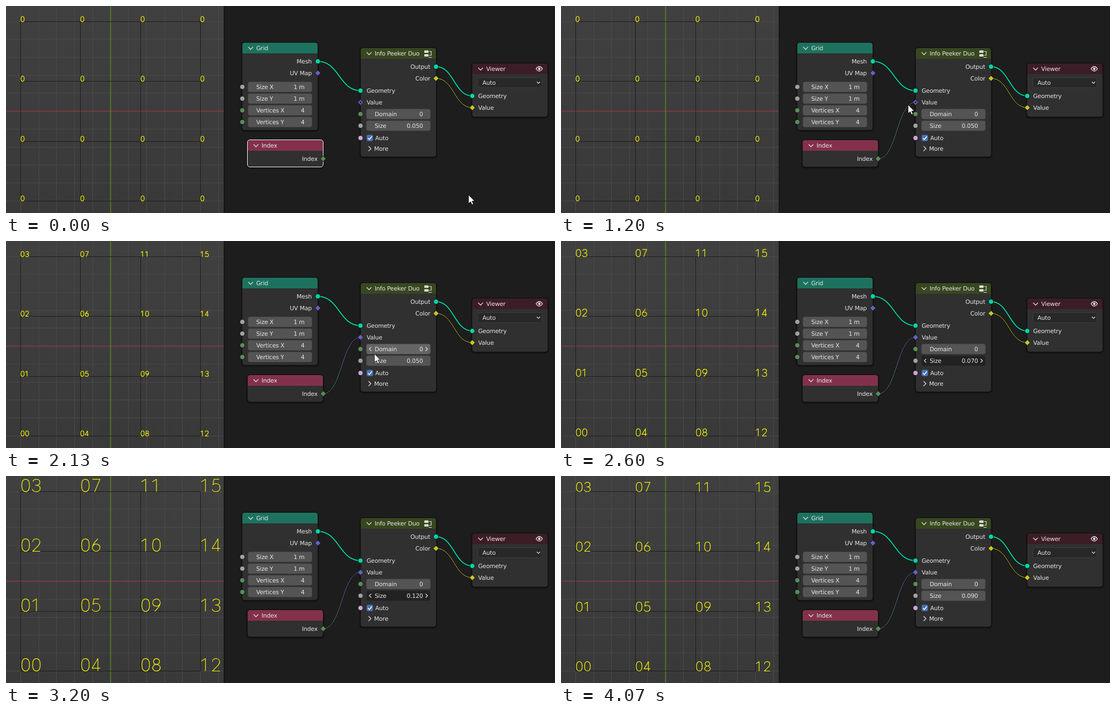
An HTML page for the animation above (4.74 s loop, 1029 by 389 pixels).

```html
<!DOCTYPE html>
<html lang="en">
<head>
<meta charset="utf-8">
<title>Node viewer</title>
<style>
html, body { margin: 0; width: 100%; height: 100%; overflow: hidden; background: #1d1d1d; }
svg { display: block; width: 1029px; height: 389px; }
text { font: 11px "DejaVu Sans", sans-serif; letter-spacing: -.2px; fill: #e6e6e6; white-space: pre; text-rendering: geometricPrecision; }
</style>
</head>
<body>
<svg id="stage" viewBox="0 0 1029 389">
  <defs>
    <linearGradient id="sky" x2="0" y2="1"><stop stop-color="#404040"/><stop offset="1" stop-color="#393939"/></linearGradient>
    <linearGradient id="blend" gradientUnits="userSpaceOnUse" x1="595" y1="287" x2="664" y2="181">
      <stop stop-color="#598c5c"/><stop offset="1" stop-color="#6363c7"/>
    </linearGradient>
    <clipPath id="view"><rect width="408" height="389"/></clipPath>
  </defs>
  <rect width="1029" height="389" fill="#1d1d1d"/>
  <g clip-path="url(#view)">
    <rect width="408" height="389" fill="url(#sky)"/>
    <g id="floor" fill="none"></g>
    <g id="labels" fill="none" stroke="#f8f800" stroke-width="1.2" stroke-linejoin="round"></g>
  </g>
  <rect x="408" width="2" height="389" fill="#161616"/>
  <g id="links" fill="none"></g>
  <g id="nodes"></g>
  <path id="pointer" d="M0 0V16.2L3.8 12.8 6.4 18.4 9 17.2 6.5 11.8H11.4Z" fill="#fff" stroke="#111" stroke-width=".9"/>
</svg>
<script>
const LOOP = 4740, TICK = 1000 / 15;
const GREEN = "#598c5c", BLUE = "#6363c7", TEAL = "#00d6a3", GRAY = "#a1a1a1", YELLOW = "#c7c729";
const $ = id => document.getElementById(id);

function add(parent, tag, attrs, text) {
  const el = document.createElementNS("http://www.w3.org/2000/svg", tag);
  for (const k in attrs) el.setAttribute(k, attrs[k]);
  if (text !== undefined) el.textContent = text;
  parent.appendChild(el);
  return el;
}

// Viewport: floor lines every 0.1 m, axes, then the 4 x 4 mesh
const floor = $("floor"), STEP = 33.72;
const line = (d, stroke, width = 1) => add(floor, "path", { d, stroke, "stroke-width": width });
const snap = v => Math.floor(v) + .5;
for (let i = -6; i <= 6; i++) {
  if (!i) continue;
  line(`M${snap(196 + i * STEP)} 0V389`, "#4a4a4a");
  line(`M0 ${snap(197.6 + i * STEP)}H408`, "#4a4a4a");
}
line("M0 197.5H408", "#8d3b42", 1.3);
line("M196 0V389", "#5d8a24", 1.5);
const cols = [27.5, 139.5, 252.5, 364.5], rows = [366.5, 254.5, 141.5, 29.5];
cols.forEach(x => line(`M${x} 29V367`, "#1c1c1c"));
rows.forEach(y => line(`M27 ${y}H365`, "#1c1c1c"));

// Single-stroke digits, 43 units tall, advance 37
const DIGITS = [
  "M18 0C8 0 5 9 5 21.5S8 43 18 43 31 34 31 21.5 28 0 18 0Z",
  "M4 9L18 0V43",
  "M5 11C5 4 10 0 17 0S30 4 30 11C30 17 27 20 23 25L5 43H31",
  "M6 8C7 3 12 0 18 0 25 0 30 4 30 11S25 21 15 21C26 21 31 25 31 32S26 43 17 43C10 43 5 39 4 34",
  "M24 43V0L4 33H32",
  "M28 0H10L7 19C10 16 14 15 17 15 26 15 31 21 31 29S26 43 17 43C10 43 6 40 4 35",
  "M24 0C12 12 5 22 5 30a13 13 0 1 0 26 0a13 13 0 0 0-25-4",
  "M5 0H31L13 43",
  "M18 0a10.5 10.2 0 1 0 .1 0ZM18 20.4a13 11.3 0 1 0 .1 0Z",
  "M12 43C24 31 31 21 31 13a13 13 0 1 0-26 0a13 13 0 0 0 25 4"
];
const labels = [];
cols.forEach((x, c) => rows.forEach((y, r) => {
  const g = add($("labels"), "g", {}), n = c * 4 + r;
  const digit = (d, dx) => add(g, "path", { d: DIGITS[d], transform: `translate(${dx} -43)`, "vector-effect": "non-scaling-stroke" });
  const zero = digit(0, 0);
  const pair = [digit(Math.floor(n / 10), 0), digit(n % 10, 37)];
  labels.push({ g, x: x - .5, y, zero, pair });
}));

// Links
const curve = (x, y, u, v) => {
  const h = Math.abs(u - x) * .5;
  return `M${x} ${y}C${x + h} ${y} ${u - h} ${v} ${u} ${v}`;
};
function link(d, stroke, width) {
  return ["#111", stroke].map((s, i) =>
    add($("links"), "path", { d, stroke: s, "stroke-width": i ? width : width + 1.6 }));
}
link(curve(584.5, 104, 664.5, 159), TEAL, 2);
link(curve(806, 114, 874, 169), TEAL, 2);
link(curve(806, 136, 874, 191), YELLOW, 1);
const wire = link("", GREEN, 1);

// Nodes
const nodes = $("nodes");
const label = (x, y, s, anchor = "start") => add(nodes, "text", { x, y: y + 4, "text-anchor": anchor }, s);
const mark = (d, attrs) => add(nodes, "path", { d, fill: "none", stroke: "#e0e0e0", "stroke-width": 1.3, ...attrs });
const box = (x, y, width, height, rx, attrs) => add(nodes, "rect", { x, y, width, height, rx, ...attrs });

function node(x, y, h, color, title) {
  for (let i = 3; i > 0; i--) box(x - i, y - i + 1, 141 + 2 * i, h + 2 * i, 4 + i, { fill: "#000", opacity: .17 });
  box(x, y, 141, h, 4, { fill: "#303030" });
  mark(`M${x} ${y + 20}V${y + 4}a4 4 0 0 1 4-4h133a4 4 0 0 1 4 4v16Z`, { fill: color, stroke: "none" });
  const edge = box(x - .5, y - .5, 142, h + 1, 4.5, { fill: "none", stroke: "#121212" });
  mark(`M${x + 11} ${y + 8}l4.5 4.5 4.5-4.5`);
  label(x + 26, y + 10, title);
  return edge;
}
function field(x, y, name, value) {
  return { rect: box(x, y - 9.5, 120, 19, 4, { fill: "#545454" }), name: label(x + 15.5, y, name), value: label(x + 106, y, value, "end") };
}
function arrows(y) {
  return mark(`M684.5 ${y - 3.5}l-3.5 3.5 3.5 3.5M786.5 ${y - 3.5}l3.5 3.5-3.5 3.5`);
}
const ball = (x, y, fill) => add(nodes, "circle", { cx: x, cy: y, r: 4.6, fill, stroke: "#151515", "stroke-width": .9 });
const gem = (x, y, fill) => mark(`M${x} ${y - 5.3}l5.3 5.3-5.3 5.3-5.3-5.3Z`, { fill, stroke: "#151515", "stroke-width": .9 });

node(443, 69, 164, "#1d725e", "Grid");
label(573, 104, "Mesh", "end");
label(573, 126, "UV Map", "end");
[["Size X", "1 m"], ["Size Y", "1 m"], ["Vertices X", "4"], ["Vertices Y", "4"]].forEach(([name, value], i) => {
  field(453.5, 152 + i * 22, name, value);
  ball(443, 152 + i * 22, i < 2 ? GRAY : GREEN);
});
ball(584.5, 104, TEAL);
gem(584.5, 126, BLUE);

const indexEdge = node(453, 252, 50, "#83314a", "Index");
label(584, 287, "Index", "end");
gem(594.5, 287, GREEN);

node(665, 79, 204, "#37471f", "Info Peeker Duo");
box(784, 83.5, 8, 4.5, 1, { fill: "#e0e0e0" });
box(784, 90.5, 8, 4.5, 1, { fill: "#e0e0e0" });
mark("M793 85.5h4v7h-4M792 96.5h6", { "stroke-width": 1.2 });
label(795, 114, "Output", "end");
label(795, 136, "Color", "end");
label(676, 159, "Geometry");
label(676, 181, "Value");
const domain = field(675.5, 203, "Domain", "0"), size = field(675.5, 225, "Size", "0.050");
const domainArrows = arrows(203), sizeArrows = arrows(225);
box(676, 242, 12, 12, 3, { fill: "#4772b3" });
mark("M678.5 248.3l2.6 2.8 4.6-6", { stroke: "#fff", "stroke-width": 1.6 });
label(692, 248, "Auto");
mark("M679.5 263.5l4.5 4.5-4.5 4.5");
label(690, 268, "More");
ball(806, 114, TEAL);
gem(806, 136, YELLOW);
ball(664.5, 159, TEAL);
gem(664.5, 181, BLUE);
const dot = add(nodes, "circle", { cx: 664.5, cy: 181, r: 1.7, fill: "#151515" });
ball(664.5, 203, GREEN);
ball(664.5, 225, GRAY);
ball(664.5, 248, "#cca6d6");

node(874, 108, 100, "#3c1d26", "Viewer");
mark("M993.5 118q6-8.5 12 0q-6 8.5-12 0Z", { stroke: "#eee" });
add(nodes, "circle", { cx: 999.5, cy: 118, r: 2.2, fill: "#eee" });
box(884.5, 134.5, 120, 19, 4, { fill: "#282828", stroke: "#3d3d3d" });
label(893, 144, "Auto");
mark("M995 142.5l3 3 3-3", { "stroke-width": 1.2 });
label(885, 169, "Geometry");
label(885, 191, "Value");
ball(874, 169, TEAL);
gem(874, 191, YELLOW);

// Motion: tick, x, y
const path = [[0, 867, 355], [8, 602, 290], [9, 599, 285], [12, 599, 285], [16, 638, 193], [19, 657, 182],
  [23, 657, 182], [26, 685, 200], [31, 690, 208], [33, 691, 216], [58, 691, 216], [60, 728, 334]];
const sizes = [[0, .05], [39, .07], [40, .1], [41, .15], [42, .2], [43, .22], [46, .19], [47, .15], [48, .12], [51, .1], [52, .09]];

function place(n) {
  const i = path.findIndex(k => k[0] > n);
  if (i < 0) return path[path.length - 1].slice(1);
  const [a, x, y] = path[i - 1], [b, u, v] = path[i];
  let p = (n - a) / (b - a);
  if (!a) p = p * p * (3 - 2 * p);
  return [x + (u - x) * p, y + (v - y) * p];
}
const show = (el, on) => el.setAttribute("visibility", on ? "visible" : "hidden");

function draw(ms) {
  const n = Math.floor((ms % LOOP + 4) / TICK);
  const [x, y] = place(n);
  const linked = n >= 24, drag = n >= 36 && n < 58;

  $("pointer").setAttribute("transform", `translate(${x} ${y})`);
  show($("pointer"), !drag && n < 61);
  indexEdge.setAttribute("stroke", n < 12 ? "#fff" : "#121212");

  const end = n >= 17 ? [664.5, 181] : [x, y];
  wire.forEach(w => { w.setAttribute("d", curve(594.5, 287, ...end)); show(w, n >= 13); });
  wire[1].setAttribute("stroke", linked ? "url(#blend)" : GREEN);
  show(dot, !linked);

  const over = x > 676 && x < 795 && n < 61;
  const onDomain = over && y > 193 && y < 214, onSize = over && y >= 214 && y < 235;
  domain.rect.setAttribute("fill", onDomain ? "#656565" : "#545454");
  size.rect.setAttribute("fill", drag ? "#222" : onSize ? "#656565" : "#545454");
  show(domainArrows, onDomain);
  show(sizeArrows, onSize || drag);

  const value = sizes.filter(s => s[0] <= n).pop()[1];
  size.value.textContent = value.toFixed(3);
  for (const l of labels) {
    l.g.setAttribute("transform", `translate(${l.x} ${l.y}) scale(${value / .22})`);
    show(l.zero, !linked);
    l.pair.forEach(d => show(d, linked));
  }
}

function run() {
  draw(performance.now());
  requestAnimationFrame(run);
}
run();
</script>
</body>
</html>
```
